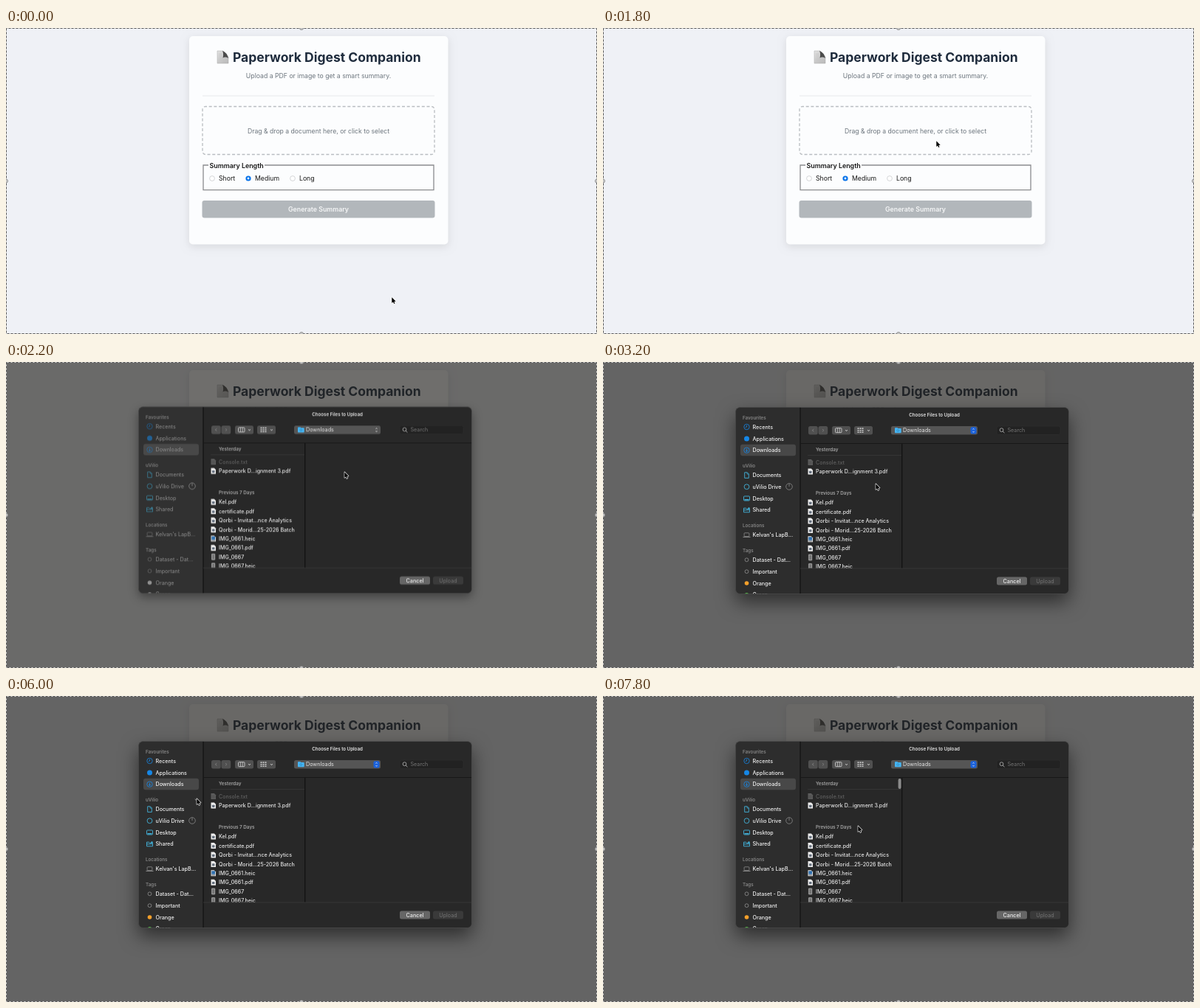
Animation, 800 px wide and 415 px high, one loop 8 s. Source, as an HTML page with a canvas:

```html
<!DOCTYPE html>
<html lang="en">
<head>
<meta charset="utf-8">
<title>Document upload</title>
<style>
  html, body { margin: 0; width: 100%; height: 100%; overflow: hidden; background: #eff1f6; }
  canvas { display: block; width: 800px; height: 415px; }
</style>
</head>
<body>
<canvas id="stage"></canvas>
<script>
const W = 800, H = 415, LOOP = 8000, STEP = 200;
const dpr = window.devicePixelRatio || 1;

function setup(canvas) {
  canvas.width = W * dpr;
  canvas.height = H * dpr;
  const c = canvas.getContext('2d');
  c.scale(dpr, dpr);
  return c;
}
const stage = setup(document.getElementById('stage'));
const layer = document.createElement('canvas');
const sheet = setup(layer);
let g = stage;

// Pointer path: time, x, y
const path = [
  [0, 522, 365], [200, 541, 345], [400, 575, 302], [600, 590, 258],
  [800, 560, 206], [1000, 500, 170], [1200, 464, 157], [1600, 451, 153],
  [2000, 451, 153], [2200, 458, 149], [2600, 420, 157], [3000, 376, 165],
  [3200, 369, 165], [3600, 371, 169], [4200, 345, 181], [4800, 366, 174],
  [5400, 318, 170], [6000, 258, 139], [6400, 296, 147], [7000, 349, 172],
  [7400, 349, 172], [7800, 345, 176], [8000, 345, 176]
];

function pointerAt(t) {
  const i = path.findIndex(p => p[0] > t);
  const [t0, x0, y0] = path[i - 1], [t1, x1, y1] = path[i];
  const k = (t - t0) / (t1 - t0);
  return [x0 + (x1 - x0) * k, y0 + (y1 - y0) * k];
}

function box(x, y, w, h, r, fill, stroke, lw = 1) {
  g.beginPath();
  g.roundRect(x, y, w, h, r);
  paint(fill, stroke, lw);
}
function shadowBox(x, y, w, h, r, fill, shadow, blur, drop) {
  g.save();
  g.shadowColor = shadow;
  g.shadowBlur = blur * dpr;
  g.shadowOffsetY = drop * dpr;
  box(x, y, w, h, r, fill);
  g.restore();
}
function disc(x, y, r, fill, stroke, lw = 0.8) {
  g.beginPath();
  g.arc(x, y, r, 0, Math.PI * 2);
  paint(fill, stroke, lw);
}
function paint(fill, stroke, lw) {
  if (fill) { g.fillStyle = fill; g.fill(); }
  if (stroke) { g.strokeStyle = stroke; g.lineWidth = lw; g.stroke(); }
}
function line(color, lw, ...pts) {
  g.beginPath();
  for (let i = 0; i < pts.length; i += 2) g.lineTo(pts[i], pts[i + 1]);
  paint(null, color, lw);
}
// y is the middle of the capital letters
function text(s, x, y, size, color, weight = 400, align = 'left') {
  g.font = `${weight} ${size}px Inter, "Open Sans", sans-serif`;
  g.textAlign = align;
  g.fillStyle = color;
  g.fillText(s, x, y + size * 0.36);
}
function chevron(x, y, dx, dy, color, lw = 0.9) {
  // dx, dy: direction of the point
  line(color, lw, x - dx - dy * 1.6, y - dy - dx * 1.6, x + dx, y + dy, x - dx + dy * 1.6, y - dy + dx * 1.6);
}

function titleIcon() {
  const grad = g.createLinearGradient(286, 31, 300, 48);
  grad.addColorStop(0, '#e2e2e2');
  grad.addColorStop(1, '#b9b9b9');
  g.beginPath();
  g.moveTo(286, 31); g.lineTo(294, 31); g.lineTo(301, 39); g.lineTo(301, 48); g.lineTo(286, 48);
  g.closePath();
  paint(grad, '#a9a9a9', 0.5);
  g.beginPath();
  g.moveTo(293, 31);
  g.quadraticCurveTo(299, 33, 301, 41);
  g.quadraticCurveTo(297, 38.5, 293.5, 40.5);
  g.quadraticCurveTo(295, 35, 293, 31);
  paint('#4b4b4b');
  for (let y = 35; y < 46; y += 2) line('#bcbcbc', 0.5, 288, y, y < 41 ? 292 : 299, y);
}

function radio(x, label, on) {
  if (on) {
    disc(x, 204, 3.6, '#0a74ea');
    disc(x, 204, 1.4, '#fff');
  } else disc(x, 204, 3.4, '#fff', '#c3c5c8', 0.7);
  text(label, x + 9, 204.3, 8.7, '#161616');
}

function drawPage() {
  g.fillStyle = '#eff1f6';
  g.fillRect(0, 0, W, H);
  shadowBox(248, 11, 350.5, 282.5, 5, '#fcfdfe', 'rgba(0,0,0,.1)', 11, 3);

  titleIcon();
  text('Paperwork Digest Companion', 307, 39.8, 17.5, '#1f2c3d', 700);
  text('Upload a PDF or image to get a smart summary.', 423, 64.5, 8.7, '#6c757d', 400, 'center');
  line('#e7e9eb', 1, 266, 92, 580, 92);

  g.setLineDash([4, 2.7]);
  box(266, 106.5, 314, 65, 4, null, '#b9bdc1', 1.3);
  g.setLineDash([]);
  text('Drag & drop a document here, or click to select', 423, 139.5, 8.65, '#6c757d', 400, 'center');

  box(267, 186, 312, 33.7, 0, null, '#8b8c8e', 1.3);
  g.fillStyle = '#fcfdfe';
  g.fillRect(274, 182, 76, 9);
  text('Summary Length', 275.5, 186.5, 8.9, '#161616', 600);
  radio(279, 'Short');
  radio(328, 'Medium', true);
  radio(388, 'Long');

  box(265.5, 234, 315, 23.5, 3, '#b2b7bb');
  text('Generate Summary', 423, 246, 8.8, '#f5f6f7', 600, 'center');
}

const icons = {
  clock(x, y, c) { disc(x, y, 3.7, null, c); line(c, 0.8, x, y - 2.2, x, y, x - 1.8, y + 0.6); },
  dot(x, y, c) { disc(x, y, 3.5, c); },
  down(x, y, c) {
    disc(x, y, 3.7, null, c);
    line(c, 0.8, x, y - 2, x, y + 1.8);
    chevron(x, y + 1.2, 0, 0.8, c, 0.8);
  },
  doc(x, y, c) {
    line(c, 0.9, x - 2.8, y - 3.8, x + 0.8, y - 3.8, x + 2.8, y - 1.8, x + 2.8, y + 3.8, x - 2.8, y + 3.8, x - 2.8, y - 3.8);
    line(c, 0.7, x + 0.6, y - 3.6, x + 0.6, y - 1.5, x + 2.8, y - 1.5);
  },
  ring(x, y, c) { disc(x, y, 3.4, null, c, 0.9); },
  desk(x, y, c) { box(x - 4, y - 3, 8, 6, 1, null, c, 0.9); line(c, 1.4, x - 3, y + 1.7, x + 3, y + 1.7); },
  folder(x, y, c) {
    line(c, 0.9, x + 4, y - 1.2, x + 4, y + 3, x - 4, y + 3, x - 4, y - 2.6, x - 1, y - 2.6, x, y - 1.4, x + 4, y - 1.4);
    line(c, 0.9, x - 4, y, x + 4, y);
    disc(x + 3, y - 2.4, 1.2, c);
  },
  laptop(x, y, c) { box(x - 3.4, y - 2.8, 6.8, 4.8, 0.8, null, c, 0.8); line(c, 1, x - 5, y + 2.8, x + 5, y + 2.8); },
  tag(x, y, c) { disc(x, y, 2.4, null, c, 0.7); },
  full(x, y, c) { disc(x, y, 2.8, c); }
};

const BLUE = '#1687e6', CYAN = '#43b4dc', GREY = '#8d8d8d';
const heads = [['Favourites', 75.5], ['uVilio', 141], ['Locations', 222], ['Tags', 256]];
const places = [
  ['Recents', 88, 'clock', BLUE], ['Applications', 104, 'dot', BLUE], ['Downloads', 119.7, 'down', BLUE],
  ['Documents', 153.6, 'doc', CYAN], ['uVilio Drive', 169.2, 'ring', CYAN],
  ['Desktop', 185, 'desk', CYAN], ['Shared', 200.8, 'folder', CYAN],
  ["Kelvan's LapB...", 234.6, 'laptop', GREY],
  ['Dataset - Dat...', 268.3, 'tag', '#a0a0a0'], ['Important', 284.2, 'tag', '#a0a0a0'],
  ['Orange', 300, 'full', '#f5a02a'], ['Green', 315.8, 'full', '#55b848']
];
const files = [
  ['Console.txt', 136, 'dim'], ['Paperwork D...ignment 3.pdf', 148.5, 'pdf'],
  ['Kel.pdf', 190.5, 'pdf'], ['certificate.pdf', 203, 'pdf'],
  ['Qorbi - Invitat...nce Analytics', 215.5, 'pdf'], ['Qorbi - Morid...25-2026 Batch', 228, 'pdf'],
  ['IMG_0661.heic', 240.3, 'heic'], ['IMG_0661.pdf', 252.7, 'pdf'],
  ['IMG_0667', 265, 'strip'], ['IMG_0667.heic', 277.5, 'strip']
];

function fileIcon(kind, y) {
  if (kind === 'strip') {
    box(278.4, y - 4, 4.4, 8, 0.4, '#8c8c8c', '#c4c4c4', 0.5);
    for (const d of [-2, 0, 2]) line('#444', 0.9, 279.8, y + d, 281.4, y + d);
    return;
  }
  const dim = kind === 'dim';
  g.beginPath();
  for (const [x, dy] of [[277.5, -4], [281.8, -4], [284, -1.8], [284, 4], [277.5, 4]]) g.lineTo(x, y + dy);
  g.closePath();
  paint(dim ? '#5c5c5c' : '#ededed');
  if (dim) for (const d of [-1, 0.6, 2.2]) line('#444', 0.5, 278.6, y + d, 282.8, y + d);
  else if (kind === 'pdf') box(279, y - 0.8, 3.5, 3.2, 0.6, '#66707e');
  else { box(278.3, y - 3, 4.8, 4.4, 0, '#2f6fae'); line('#29313a', 0.8, 278.3, y + 2.6, 283.2, y + 2.6); }
}

function drawSidebar(active, hover) {
  g.fillStyle = active ? '#2d2d2d' : '#313131';
  g.fillRect(179, 61, 88, 254);
  box(186, 111.8, 75, 15.4, 3, '#484848');
  for (const [s, y] of heads) text(s, 189, y, 6.25, active ? '#858585' : '#7a7a7a', 600);
  for (const [s, y, icon, color] of places) {
    g.globalAlpha = active ? 1 : 0.55;
    icons[icon](194.5, y, !active && icon === 'full' ? '#e0e0e0' : color);
    g.globalAlpha = 1;
    text(s, 202.5, y, 7.15, active ? '#f2f2f2' : '#8f8f8f', active ? 500 : 400);
  }
  disc(252, 169, 4.3, null, '#8a8a8a', 0.8);
  line('#8a8a8a', 0.8, 252, 165, 252, 169);
  if (hover) chevron(257, 140.5, 0, 0.8, '#888');
}

function drawToolbar(active) {
  text('Choose Files to Upload', 448.5, 71.5, 6.2, '#e4e4e4', 600, 'center');
  box(278, 87, 12.7, 11.5, 2.5, '#505050');
  box(291.5, 87, 12.7, 11.5, 2.5, '#505050');
  chevron(284.3, 92.7, -1, 0, '#858585');
  chevron(298, 92.7, 1, 0, '#7c7c7c');
  for (const x of [310, 340]) {
    box(x, 87, 25, 11.5, 2.5, '#505050');
    chevron(x + 19.5, 92.9, 0, 0.8, '#ddd');
  }
  box(314.5, 89.7, 8.5, 6, 1, null, '#ddd', 0.8);
  line('#ddd', 0.7, 317.3, 89.7, 317.3, 95.7);
  line('#ddd', 0.7, 320.2, 89.7, 320.2, 95.7);
  for (let i = 0; i < 9; i++) box(344.5 + i % 3 * 3, 89.3 + (i / 3 | 0) * 2.6, 2, 1.6, 0.3, '#ccc');

  box(390, 87, 117, 11.5, 2.5, '#555');
  box(395, 89, 4, 3, 0.7, '#3aa5e6');
  box(395, 89.9, 8.7, 6.3, 0.8, '#47b5f2');
  disc(399.3, 93, 1.4, null, '#2784bd', 0.7);
  text('Downloads', 406, 92.8, 7.2, '#e6e6e6');
  if (active) box(497.5, 88.2, 8, 9.2, 2, '#1b62dc');
  chevron(501.5, 90.9, 0, -0.6, '#eee', 0.8);
  chevron(501.5, 94.7, 0, 0.6, '#eee', 0.8);

  box(533, 87, 86, 11.5, 2.5, '#222', '#303030', 0.6);
  disc(539.5, 92.2, 2.4, null, '#bbb', 0.8);
  line('#bbb', 0.9, 541.2, 94, 543.4, 96.2);
  text('Search', 547.5, 92.8, 7.2, '#757575');
}

function drawFiles(scrolling) {
  line('#181818', 1, 267, 110.5, 630.5, 110.5);
  line('#393939', 0.8, 277, 126.5, 404, 126.5);
  line('#101010', 1.2, 404.7, 111, 404.7, 280);
  line('#3c3c3c', 0.8, 267, 280, 630.5, 280);
  text('Yesterday', 288, 119, 6.3, '#a2a2a2', 600);
  text('Previous 7 Days', 288, 177.7, 6.3, '#a2a2a2', 600);
  g.save();
  g.beginPath();
  g.rect(268, 111, 136, 168.5);
  g.clip();
  for (const [s, y, kind] of files) {
    fileIcon(kind, y);
    text(s, 288, y, 7.1, kind === 'dim' ? '#606060' : '#e6e6e6', 500);
  }
  g.restore();
  if (scrolling) box(399.6, 112, 4, 14, 2, '#8b8b8b');
}

function drawDialog(active, hover, scrolling) {
  const frame = [179.5, 61.5, 451, 253, 6];
  g.clearRect(0, 0, W, H);
  if (active) shadowBox(...frame, '#282828', 'rgba(0,0,0,.55)', 26, 11);
  else shadowBox(...frame, '#282828', 'rgba(0,0,0,.4)', 14, 5);

  g.save();
  g.beginPath();
  g.roundRect(...frame);
  g.clip();
  drawSidebar(active, hover);
  line('#111', 1.2, 267, 61, 267, 315);
  drawToolbar(active);
  drawFiles(scrolling);
  box(533, 291.4, 41, 11.2, 2.5, '#666');
  text('Cancel', 553.5, 297, 7.2, '#f0f0f0', 500, 'center');
  box(578, 291.4, 41, 11.2, 2.5, '#3a3a3a');
  text('Upload', 598.5, 297, 7.2, '#747474', 400, 'center');
  g.restore();
  box(...frame, null, '#505050', 0.7);
}

function drawFrame() {
  const edge = [0.5, 0.5, 799.5, 0.5, 799.5, 414.5, 0.5, 414.5, 0.5, 0.5];
  line('#dedede', 1, ...edge);
  g.setLineDash([3, 2]);
  g.lineDashOffset = 2;
  line('#5c5c5c', 1, ...edge);
  g.setLineDash([]);
  for (const [x, y] of [[400, 0], [400, 415], [0, 207.5], [800, 207.5]]) disc(x, y, 2.6, '#c4c4c4', '#808080', 0.7);
}

function drawPointer(x, y) {
  g.save();
  g.translate(x, y);
  g.scale(0.93, 0.93);
  g.beginPath();
  for (const p of [[0.3, 0.2], [0.3, 8.6], [2.2, 6.9], [3.5, 9.8], [4.8, 9.2], [3.6, 6.4], [6.1, 6.1]]) g.lineTo(...p);
  g.closePath();
  g.lineJoin = 'round';
  paint(null, '#fff', 1.3);
  paint('#000');
  g.restore();
}

function render(t) {
  const [px, py] = pointerAt(t);
  g = stage;
  drawPage();
  if (t >= 2000) {
    const opening = t < 2200, active = t >= 2400;
    const dim = opening ? 0.11 : active ? 0.67 : 0.645;
    g.fillStyle = `rgba(33,32,29,${dim})`;
    g.fillRect(0, 0, W, H);
    g = sheet;
    drawDialog(active, active && px < 267, t >= 7600);
    g = stage;
    g.globalAlpha = opening ? 0.36 : 1;
    g.drawImage(layer, 0, opening ? -17 : active ? 0 : -0.7, W, H);
    g.globalAlpha = 1;
  }
  drawFrame();
  drawPointer(px, py);
}

const start = performance.now();
function tick() {
  const t = (performance.now() - start) % LOOP;
  render(Math.floor(t / STEP) * STEP);
  requestAnimationFrame(tick);
}
tick();
</script>
</body>
</html>
```
